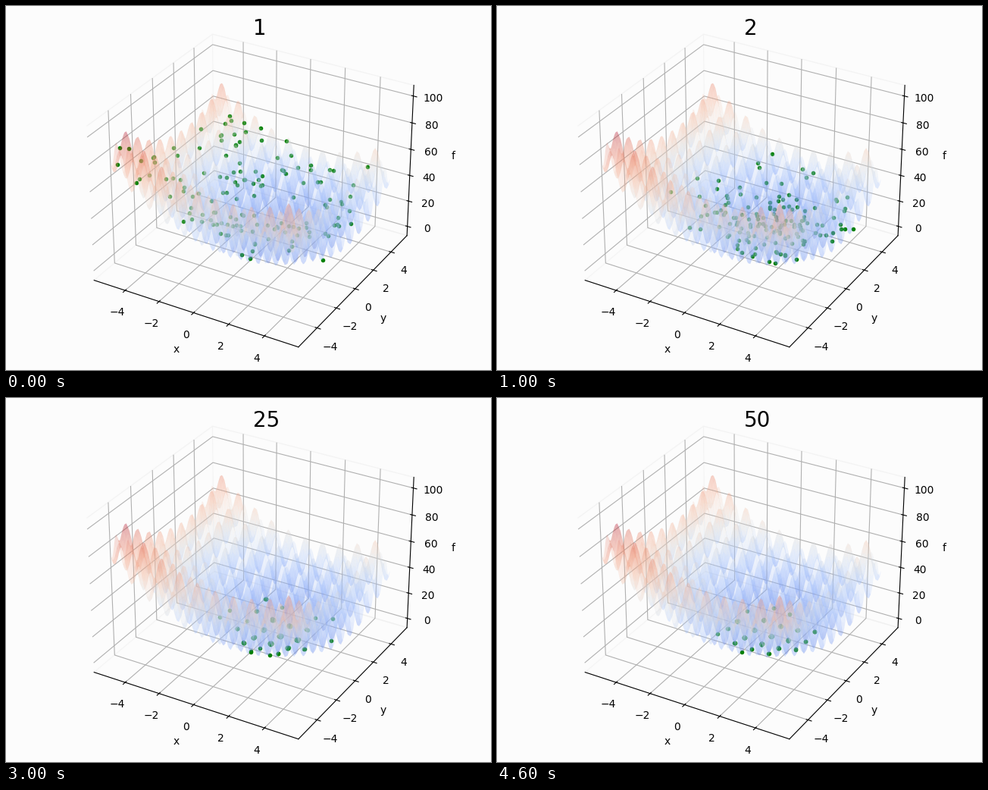
Recreate the animation shown at these times as a matplotlib script. Size 640 by 480 pixels, loop 5 s.

```python
import numpy as np
import matplotlib.pyplot as plt
from matplotlib.animation import FuncAnimation

W, H = 640, 480
BOUND = 5.12
POPULATION = 140
BG = "#fcfcfc"

# generation number, spread around the optimum, pull into the local minima
STAGES = ((1, None, 0), (2, 1.9, 0.4), (5, 1.5, 0.6),
          (25, 1.05, 0.9), (50, 0.9, 0.95))


def rastrigin(x, y):
    return sum((v - 1) ** 2 - 10 * np.cos(2 * np.pi * (v - 1)) + 10
               for v in (x, y))


def population(rng, spread, pull):
    """Uniform at first, later gathered in the basins near (1, 1)."""
    size = (2, POPULATION)
    if spread is None:
        return rng.uniform(-BOUND, BOUND, size)
    pts = rng.normal(0.9, spread, size)
    pts += pull * (np.round(pts) - pts)
    return pts.clip(-BOUND, BOUND)


def padded(low, high):
    """Limits with the usual data margin and the 3D view margin."""
    mid, half = (low + high) / 2, (high - low) / 2 * 1.1 * 25 / 24
    return mid - half, mid + half


rng = np.random.default_rng(8)
clouds = [population(rng, spread, pull) for _, spread, pull in STAGES]

fig = plt.figure(figsize=(W / 100, H / 100), dpi=100, facecolor=BG)
ax = fig.add_axes([0, 0, 1, 1], projection="3d", facecolor=BG)

axis = np.linspace(-BOUND, BOUND, 101)
X, Y = np.meshgrid(axis, axis)
Z = rastrigin(X, Y)
ax.plot_surface(X, Y, Z, rstride=1, cstride=1, cmap="coolwarm",
                alpha=0.2, linewidth=0)
dots, = ax.plot([0], [0], [0], "g.", markersize=6)
label = fig.text(326 / W, 1 - 38 / H, "", fontsize=20)

ax.set_xlim(padded(-BOUND, BOUND))
ax.set_ylim(padded(-BOUND, BOUND))
ax.set_zlim(padded(0, Z.max()))
ax.set(xlabel="x", ylabel="y", zlabel="f")
for a in (ax.xaxis, ax.yaxis, ax.zaxis):
    a.pane.set_facecolor(BG)
    a.pane.set_edgecolor("#ececec")


def update(k):
    x, y = clouds[k]
    dots.set_data_3d(x, y, rastrigin(x, y))
    label.set_text(str(STAGES[k][0]))
    return dots, label


anim = FuncAnimation(fig, update, frames=len(STAGES), interval=1000,
                     repeat=True, repeat_delay=0, blit=False)
plt.show()
```
